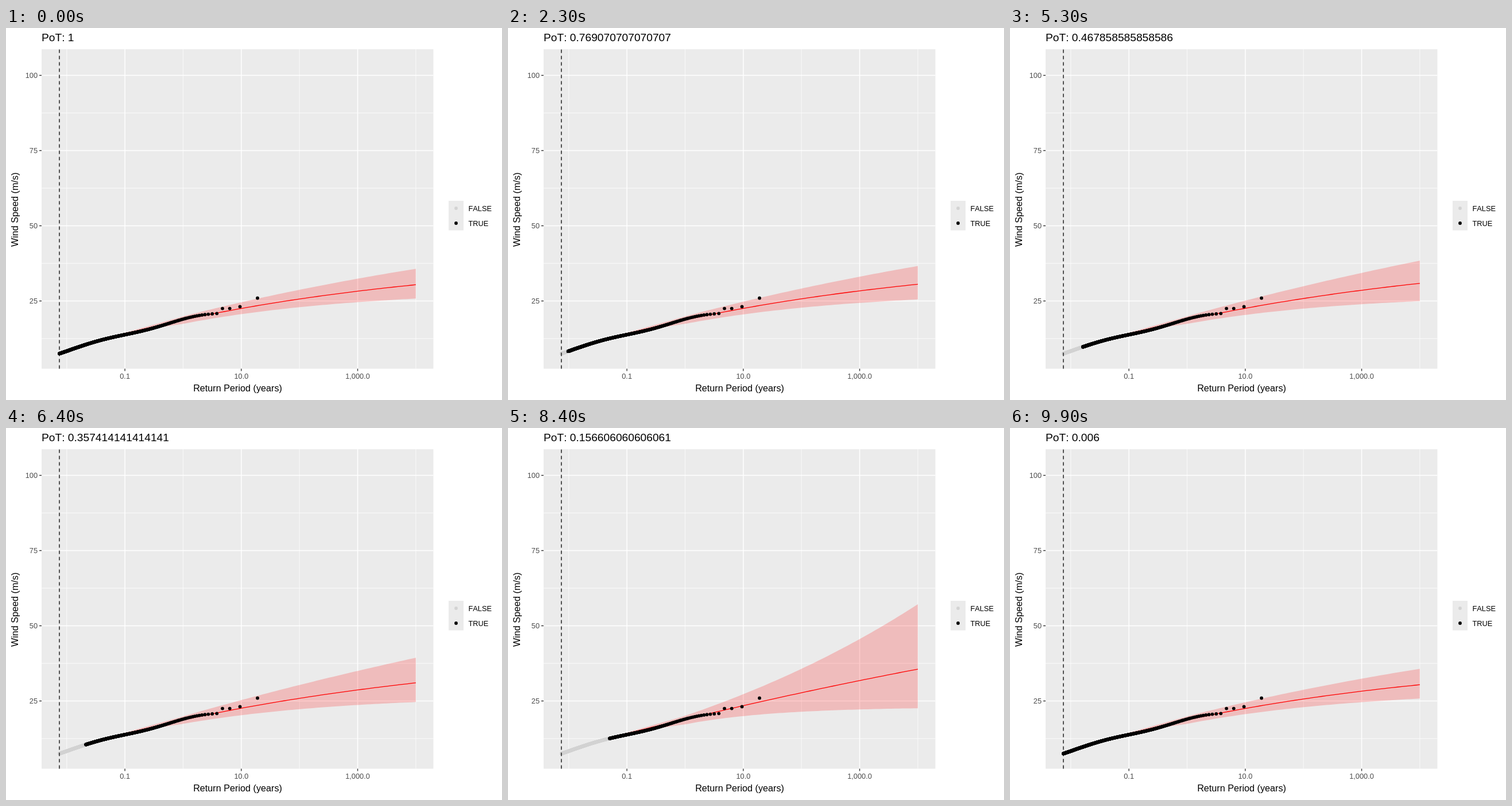
Write an HTML page with a canvas that moves like this. It is 864x648 px and loops after 10000 ms.

```html
<!DOCTYPE html>
<html lang="en">
<head>
<meta charset="utf-8">
<title>Return periods</title>
<style>
html, body { margin: 0; width: 100%; height: 100%; overflow: hidden; background: #fff; }
canvas { display: block; }
</style>
</head>
<body>
<canvas id="stage" width="864" height="648"></canvas>
<script>
const ctx = document.getElementById('stage').getContext('2d');
const LEFT = 62, RIGHT = 744.5, TOP = 37, BOTTOM = 593.5;
const FRAMES = 100, COUNT = 2533, YEARS = 19;

// x takes decades (log10 of years), y takes wind speed
const xPos = d => 308.5 + 101.35 * d;
const yPos = v => 606.5 - 5.24 * v;
const share = state => (99000 - 994 * state) / 99000;

// A curve has a speed at 1 year, a speed at 10,000 years and a growth per decade
const base = { at1: 18.7, end: 30.4, growth: .826 };
const speed = ({ at1, end, growth }, d) =>
  at1 + (end - at1) * (1 - growth ** d) / (1 - growth ** 4);

// Below one year every curve closes in on the base curve
const curve = (c, d) => d >= 0
  ? speed(c, d)
  : speed(base, d) + (c.at1 - base.at1) * Math.exp(1.2 * d);

// Fewer points widen the band, much faster once about a third remain
function fitAt(state) {
  const loss = -Math.log(share(state));
  const tail = Math.max(0, loss - 1.05);
  return {
    mid: {
      at1: base.at1 + .2 * tail,
      end: base.end + .6 * loss + 4.7 * tail,
      growth: base.growth + .02 * loss + .09 * tail
    },
    upper: {
      at1: 19.9 + .2 * tail,
      end: 35.7 + 3.5 * loss + 17.2 * tail,
      growth: .89 + .04 * loss + .24 * tail
    },
    lower: {
      at1: 17.4 - .2 * tail,
      end: 25.8 - 1.1 * loss - 1.3 * tail,
      growth: .72 - .02 * loss - .18 * tail
    }
  };
}

// Ranked speeds: four extremes, then the base curve with a gentle wave
const extremes = [25.95, 23.1, 22.5, 22.5];
const wave = d => .5 * Math.exp(d / 2) * Math.cos(2 * Math.PI * (d - .15) / 1.7) - .15;
const points = Array.from({ length: COUNT }, (_, i) => {
  const d = Math.log10(YEARS / (i + 1));
  return [xPos(d), yPos(extremes[i] ?? speed(base, d) + wave(d))];
});

function line(x0, y0, x1, y1, color, width) {
  ctx.strokeStyle = color;
  ctx.lineWidth = width;
  ctx.beginPath();
  ctx.moveTo(x0, y0);
  ctx.lineTo(x1, y1);
  ctx.stroke();
}

function text(s, x, y, size, color = '#000', align = 'left') {
  ctx.font = `${size}px "Liberation Sans", Arial, sans-serif`;
  ctx.fontKerning = 'none';
  ctx.fillStyle = color;
  ctx.textAlign = align;
  ctx.fillText(s, x, y);
}

function dot(x, y, color) {
  ctx.fillStyle = color;
  ctx.beginPath();
  ctx.arc(x, y, 2.9, 0, 7);
  ctx.fill();
}

function drawPanel() {
  ctx.fillStyle = '#fff';
  ctx.fillRect(0, 0, 864, 648);
  ctx.fillStyle = '#ebebeb';
  ctx.fillRect(LEFT, TOP, RIGHT - LEFT, BOTTOM - TOP);
  ctx.fillRect(771, 301, 26, 51.5);

  const across = (v, w) => line(LEFT, yPos(v), RIGHT, yPos(v), '#fff', w);
  const down = (d, w) => line(xPos(d), TOP, xPos(d), BOTTOM, '#fff', w);
  for (let v = 12.5; v < 100; v += 25) across(v, .75);
  for (let d = -2; d <= 4; d += 2) down(d, .75);
  for (let v = 25; v <= 100; v += 25) {
    across(v, 1.5);
    line(58, yPos(v), LEFT, yPos(v), '#333', 1.4);
    text(v, 55, yPos(v) + 4.7, 12.8, '#4d4d4d', 'right');
  }
  ['0.1', '10.0', '1,000.0'].forEach((label, i) => {
    const d = 2 * i - 1;
    down(d, 1.5);
    line(xPos(d), BOTTOM, xPos(d), BOTTOM + 4, '#333', 1.4);
    text(label, xPos(d), 611.3, 12.8, '#4d4d4d', 'center');
  });

  text('Return Period (years)', 403.5, 633, 16.2, '#000', 'center');
  ctx.save();
  ctx.translate(21, 316.3);
  ctx.rotate(-Math.PI / 2);
  text('Wind Speed (m/s)', 0, 0, 16.2, '#000', 'center');
  ctx.restore();

  dot(784, 314, '#d3d3d3');
  dot(784, 340, '#000');
  text('FALSE', 805.5, 319, 12.8);
  text('TRUE', 805.5, 345, 12.8);
}

function drawFit(state) {
  const { mid, upper, lower } = fitAt(state);
  const start = Math.log10(YEARS / COUNT / share(state));
  const ds = Array.from({ length: 81 }, (_, i) => start + (4 - start) * i / 80);
  const trace = (list, c) => list.forEach(d => ctx.lineTo(xPos(d), yPos(curve(c, d))));

  ctx.beginPath();
  trace(ds, upper);
  trace([...ds].reverse(), lower);
  ctx.fillStyle = 'rgba(255, 0, 0, .2)';
  ctx.fill();

  ctx.beginPath();
  trace(ds, mid);
  ctx.strokeStyle = '#f00';
  ctx.lineWidth = 1.3;
  ctx.stroke();
}

function draw(frame) {
  // The plot runs slightly ahead of the title and wraps on the last step
  const state = frame * FRAMES / (FRAMES - 1) % FRAMES;
  const kept = COUNT * share(state);
  drawPanel();
  text('PoT: ' + Number(share(frame).toPrecision(15)), 62, 23, 19.2);
  drawFit(state);
  for (let i = COUNT - 1; i >= 0; i--) {
    dot(...points[i], i < kept ? '#000' : '#d3d3d3');
  }
  ctx.setLineDash([6, 5]);
  line(93, BOTTOM, 93, TOP, '#000', 1.3);
  ctx.setLineDash([]);
}

let shown = -1;
const begin = performance.now();
function tick() {
  const frame = Math.floor((performance.now() - begin) / 100) % FRAMES;
  if (frame !== shown) draw(shown = frame);
  requestAnimationFrame(tick);
}
tick();
</script>
</body>
</html>
```
